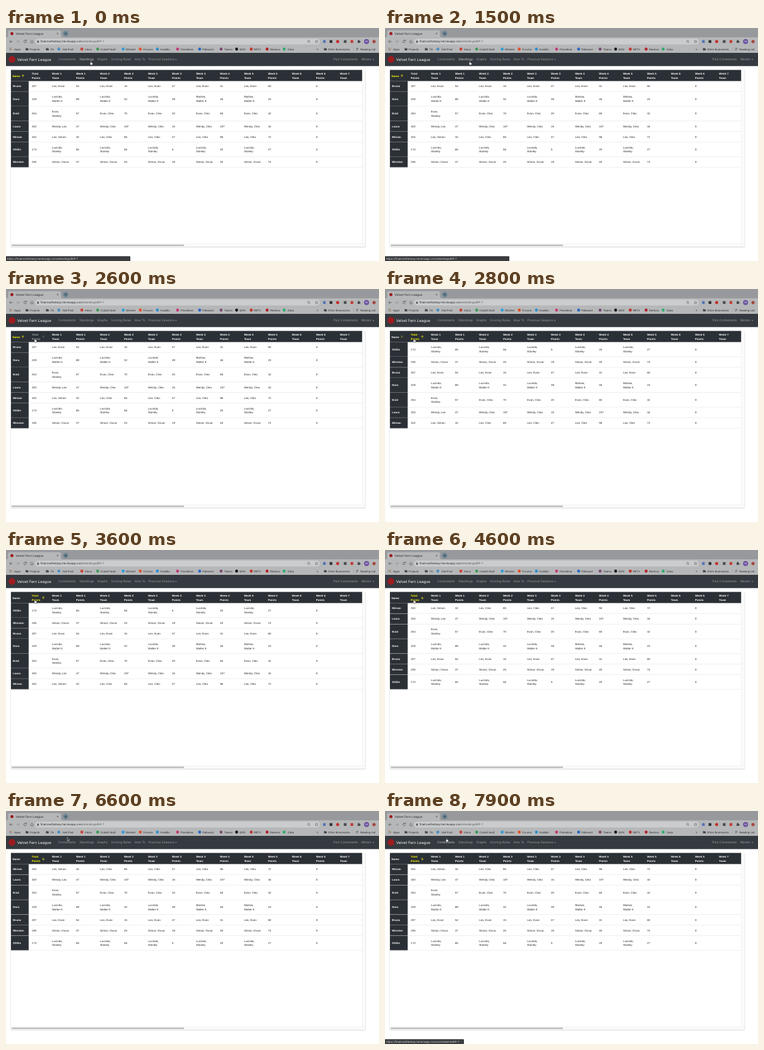
An HTML page that plays this animation: 600 px wide and 375 px high, repeating every 8 s.

```html
<!DOCTYPE html>
<html lang="en">
<head>
<meta charset="utf-8">
<title>Standings</title>
<style>
  html, body { margin: 0; width: 100%; height: 100%; overflow: hidden; background: #fff; }
  svg { display: block; width: 100vw; height: 100vh; }
  text { font-family: Inter, "Open Sans", sans-serif; text-rendering: geometricPrecision; white-space: pre; }
  .table text { font-family: "Liberation Sans", Arial, sans-serif; letter-spacing: .045px; }
</style>
</head>
<body>
<svg id="stage" viewBox="0 0 600 375"></svg>
<script>
const LOOP = 8000;
const TITLE = 'Velvet Fern League';
const HOST = 'finalrosefantasy.herokuapp.com';
const DARK = '#2b3036', NAV = '#343a40', ICON = '#46494c', ROSE = '#9c1c20';
const stage = document.getElementById('stage');

function add(parent, tag, attrs = {}, content = '') {
  const el = document.createElementNS('http://www.w3.org/2000/svg', tag);
  for (const key in attrs) el.setAttribute(key, attrs[key]);
  el.textContent = content;
  return parent.appendChild(el);
}
const group = (parent, attrs) => add(parent, 'g', attrs);
const rect = (parent, x, y, width, height, fill, rx = 0) =>
  add(parent, 'rect', { x, y, width, height, fill, rx });
const dot = (parent, cx, cy, r, fill) => add(parent, 'circle', { cx, cy, r, fill });
const line = (parent, d, stroke = ICON, width = .7) =>
  add(parent, 'path', { d, stroke, fill: 'none', 'stroke-width': width });
// y is the vertical middle of the line of text
const label = (parent, x, y, size, fill, content, extra = {}) =>
  add(parent, 'text', { x, y: y + size * .36, 'font-size': size, fill, ...extra }, content);
const show = (el, visible) => el.setAttribute('visibility', visible ? 'visible' : 'hidden');
const clamp = v => Math.min(1, Math.max(0, v));
const ease = v => v * v * (3 - 2 * v);
const progress = (t, start, end) => clamp((t - start) / (end - start));

function folder(x, y) {
  add(stage, 'path', { d: `M${x - 2.2} ${y - 1.8}h1.7l.6.6h2.1v3.2h-4.4Z`, fill: ICON });
}

function drawBrowser() {
  rect(stage, 0, 0, 600, 15, '#97999c');
  add(stage, 'path', { d: 'M1 15Q3.5 15 3.5 12.5V6Q3.5 3.5 6 3.5H86Q88.5 3.5 88.5 6V12.5Q88.5 15 91 15Z', fill: '#b6b7b8' });
  rect(stage, 0, 15, 600, 25, '#b6b7b8');
  dot(stage, 9.5, 9, 2.5, ROSE);
  label(stage, 15.5, 9.2, 4.9, '#26282a', TITLE);
  line(stage, 'M81.7 7.7l2.6 2.6m0-2.6l-2.6 2.6', ICON, .6);
  dot(stage, 96, 9, 4.4, '#6f8796');
  line(stage, 'M93.9 9h4.2M96 6.9v4.2', '#25343e', .7);

  line(stage, 'M10.5 21.8H6m2-2.1l-2.1 2.1 2.1 2.1');
  line(stage, 'M16.7 21.8h4.5m-2-2.1l2.1 2.1-2.1 2.1', '#85878a');
  line(stage, 'M32.6 20.4a2.1 2.1 0 1 0 .2 2M33 19v1.8h-1.8');
  line(stage, 'M39.2 21.8l2.5-2.3 2.5 2.3M40 21.5v2.4h3.4v-2.4', ICON, .6);
  rect(stage, 47, 17, 458, 9.6, '#cbcccd', 4.8);
  rect(stage, 50.1, 21.2, 2.8, 2.3, ICON, .3);
  line(stage, 'M50.7 21.3v-.8a.8.8 0 0 1 1.6 0v.8', ICON, .5);
  const url = label(stage, 55.5, 21.8, 4.45, '#1f2123', HOST);
  add(url, 'tspan', { fill: '#54575a' }, '/standings/BiP-7');
  line(stage, 'M488.2 22.6l1.3 1.4M488.4 21.3a1.6 1.6 0 1 0-3.2 0a1.6 1.6 0 1 0 3.2 0', ICON, .55);
  line(stage, 'M499.5 19.2l.7 1.7 1.8.1-1.4 1.2.5 1.8-1.6-1-1.6 1 .5-1.8-1.4-1.2 1.8-.1Z', ICON, .45);
  rect(stage, 510, 19.6, 4.3, 4.3, '#5474b8', 1);
  rect(stage, 520.5, 19.5, 4.5, 4.5, '#303437', .8);
  dot(stage, 533.5, 21.8, 2.5, '#c2302c');
  rect(stage, 543.4, 19.6, 4.4, 4.4, '#4b4d50', .8);
  rect(stage, 554.2, 19.6, 4.4, 4.4, '#c43a34', .8);
  rect(stage, 565.6, 20.2, 3.8, 3.8, ICON, .6);
  dot(stage, 567.4, 20, .9, ICON);
  dot(stage, 569.6, 22.1, .9, ICON);
  dot(stage, 580, 21.8, 4, '#6b4fa0');
  label(stage, 580, 21.8, 4, '#eee', 'M', { 'text-anchor': 'middle' });
  dot(stage, 592, 21.8, 2.6, '#a5483e');

  const bookmarks = [
    [85, 91, 'Hall Post', '#4b8fc4'], [122, 127.2, 'Inbox', '#c8453a'],
    [147.5, 152, 'Cobalt Vault', '#3f9a58'], [188.5, 192.7, 'Wrenlet', '#2f9bd8'],
    [216, 221, 'Forumo', '#e2522a'], [243.5, 248.3, 'Huddlio', '#2d8fd0'],
    [276, 281, 'Pixmellow', '#c23b78'], [311.5, 316, 'Palboard', '#2a69c4'],
    [346, 351, 'Teamo', '#7d4b74'], [371, 375.5, 'QVN', '#17191b'],
    [394.5, 399, 'RKTV', '#c23430'], [420, 425, 'Reelvox', '#b5242a'],
    [447.5, 453, 'Zubu', '#2fae6e']
  ];
  const dots = ['#c8453a', '#cf9b2d', '#3f9a58', '#3c73c0'];
  for (let i = 0; i < 9; i++)
    rect(stage, 5.6 + i % 3 * 1.5, 31.8 + Math.floor(i / 3) * 1.5, 1, 1, dots[i % 4]);
  const caption = (x, content) => label(stage, x, 34, 4.25, '#26282a', content);
  caption(13, 'Apps');
  folder(33.8, 34);
  caption(38, 'Projects');
  folder(66.5, 34);
  caption(71.5, 'TA');
  for (const [iconX, textX, name, color] of bookmarks) {
    dot(stage, iconX, 34, 2.4, color);
    caption(textX, name);
  }
  label(stage, 499.5, 33.7, 5, ICON, '»');
  folder(513.7, 34);
  caption(518, 'Other Bookmarks');
  line(stage, 'M559 31v6', '#8d8f91', .4);
  line(stage, 'M563.2 32.6h3.8m-3.8 1.5h3.8m-3.8 1.5h2.2', ICON, .6);
  caption(570, 'Reading List');
}

const navLinks = {};
function drawNav() {
  rect(stage, 0, 40, 600, 21.3, NAV);
  dot(stage, 9.7, 50.5, 5.4, ROSE);
  label(stage, 18, 50.6, 6, '#fff', TITLE);
  const links = [[84, 'Contestants'], [118, 'Standings'], [146.5, 'Graphs'], [169, 'Scoring Rules'],
    [206.5, 'How To'], [229, 'Previous Seasons'], [526.5, 'Pick Contestants'], [571.5, 'Miriam']];
  for (const [x, name] of links)
    navLinks[name] = label(stage, x, 50.6, 4.95, '#fff', name, { 'fill-opacity': .5 });
  for (const x of [271.8, 589.4])
    add(stage, 'path', { d: `M${x} 49.9h3l-1.5 1.6Z`, fill: '#fff', 'fill-opacity': .5 });
}

const HEADER_BOTTOM = 85.4, SINGLE = 17, DOUBLE = 23.6;
const columnX = i => 74.1 + 38.6 * i;
// name, weekly points, then teams: the last one repeats up to week 5
const players = [
  ['Bruno', [54, 15, 47, 31, 60], 'Leo, Evan'],
  ['Dora', [89, 32, 39, 46, 23], 'Lucinda,|Walter K', 'Lucinda,|Walter K', 'Lucinda,|Walter K', 'Marlow,|Walter K'],
  ['Enid', [57, 70, 20, 65, 42], 'Evan,|Stanley', 'Evan, Cleo'],
  ['Laura', [47, 107, 15, 107, 44], 'Wendy, Leo', 'Wendy, Cleo'],
  ['Miriam', [32, 85, 47, 96, 72], 'Leo, Simon', 'Leo, Cleo'],
  ['Ottilie', [65, 56, 5, 20, 27], 'Lucinda,|Stanley'],
  ['Winston', [37, 25, 19, 40, 74], 'Simon, Oscar']
].map(([name, points, ...teams]) => ({
  name, points, teams,
  total: points.reduce((a, b) => a + b),
  height: teams[0].includes('|') ? DOUBLE : SINGLE
}));
const byTotal = [...players].sort((a, b) => a.total - b.total);
const byTotalDown = [...byTotal].reverse();

function lines(parent, x, y, gap, fill, content, extra) {
  const parts = content.split('|');
  return parts.map((part, i) =>
    label(parent, x, y + (i - (parts.length - 1) / 2) * gap, 4.4, fill, part, extra));
}

const bold = { 'font-weight': 700 };
let nameHead, totalHead, nameArrow, totalArrow;
function drawTable() {
  const table = group(stage, { class: 'table' });
  rect(table, 7.4, 67.6, 571.4, 285.6, '#000', 1.2).setAttribute('opacity', .1);
  rect(table, 7.8, 67.4, 570.4, 285, '#d9d9d9', 1);
  rect(table, 8, 67.5, 570, 284.4, '#fff', 1);
  rect(table, 8, 67.5, 565, HEADER_BOTTOM - 67.5, DARK);
  rect(table, 573, 67.5, 5, 280, '#fafafa');
  line(table, 'M573 67.5V347.5', '#e6e6e6', .4);
  rect(table, 8, 347.4, 570, 4.5, '#fafafa');
  line(table, 'M8 347.4H578', '#e6e6e6', .4);
  rect(table, 9, 348.5, 277.5, 2.5, '#bdbdbd', 1.25);

  nameHead = lines(table, 10.6, 77, 0, '#fff', 'Name', bold);
  totalHead = lines(table, 41.6, 76.9, 7.4, '#fff', 'Total|Points', bold);
  for (let i = 0; i < 13; i++)
    lines(table, columnX(i), 76.9, 7.4, '#fff', `Week ${Math.floor(i / 2) + 1}|${i % 2 ? 'Points' : 'Team'}`, bold);
  const arrow = () => line(table, 'M0 2.1V-1.8M-1.9 0L0-1.9 1.9 0', 'yellow', .65);
  nameArrow = arrow();
  nameArrow.setAttribute('transform', 'translate(27.2 77)');
  totalArrow = arrow();

  for (const p of players) {
    p.row = group(table);
    const middle = p.height / 2;
    rect(p.row, 8, 0, 28.5, p.height + .1, DARK);
    line(p.row, `M8 ${p.height}H573`, '#dcdcdc', .45);
    lines(p.row, 11.2, middle, 0, '#fff', p.name, bold);
    const cell = (x, content) => lines(p.row, x, middle, 6.6, '#212121', String(content));
    cell(41.6, p.total);
    p.points.forEach((value, week) => {
      cell(columnX(2 * week), p.teams[Math.min(week, p.teams.length - 1)]);
      cell(columnX(2 * week + 1), value);
    });
    cell(columnX(11), 0);
  }
}

function drawStatus(path, width) {
  const bar = group(stage);
  rect(bar, -2, 367.2, width + 2, 10, '#3a3c3f', 1.2);
  label(bar, 2, 371.4, 4.3, '#d8d9da', `https://${HOST}/${path}/BiP-7`);
  return bar;
}

drawBrowser();
drawNav();
drawTable();
const standingsStatus = drawStatus('standings', 200);
const contestantsStatus = drawStatus('contestants', 127);
const pointer = add(stage, 'path', {
  d: 'M0 0V5.2L1.2 4.1 2 6 2.9 5.6 2.1 3.8H3.7Z',
  fill: '#111', stroke: '#fff', 'stroke-width': .5
});
const hand = add(stage, 'path', {
  d: 'M-.7.5a.6.6 0 0 1 1.3 0V2.3L2.5 2.8Q3 3 2.9 3.8L2.4 6H-.4L-2 3.7Q-1.9 2.9-1.2 3.2L-.7 3.7Z',
  fill: '#fff', stroke: '#111', 'stroke-width': .5
});

// start, end, x, y of each cursor move
const moves = [[1500, 2200, 46.7, 79.8], [5500, 6300, 98.6, 42.6], [7500, 7700, 99.2, 43.8]];
function cursorAt(t) {
  let x = 136.6, y = 53.4;
  for (const [start, end, toX, toY] of moves) {
    const k = ease(progress(t, start, end));
    x += (toX - x) * k;
    y += (toY - y) * k;
  }
  return { x, y };
}

function draw(t) {
  const { x, y } = cursorAt(t);
  const onStandings = x > 117 && x < 142 && y > 44 && y < 58;
  const onContestants = t >= 7600;
  const onTotal = x > 40 && x < 64 && y > 70 && y < 84;
  const isHand = onStandings || onContestants || onTotal;
  for (const cursor of [pointer, hand]) cursor.setAttribute('transform', `translate(${x} ${y})`);
  show(hand, isHand);
  show(pointer, !isHand);
  navLinks.Standings.setAttribute('fill-opacity', onStandings ? .75 : .5);
  navLinks.Contestants.setAttribute('fill-opacity', onContestants ? .75 : .5);
  show(standingsStatus, t < 1900);
  show(contestantsStatus, t >= 7900);

  const sorted = t >= 2800;
  nameHead[0].setAttribute('fill', sorted ? '#fff' : 'yellow');
  for (const part of totalHead) part.setAttribute('fill', sorted ? 'yellow' : onTotal ? '#a5a8ab' : '#fff');
  nameArrow.setAttribute('opacity', 1 - progress(t, 2700, 2900));
  totalArrow.setAttribute('stroke', sorted ? 'yellow' : '#a5a8ab');
  totalArrow.setAttribute('opacity', sorted ? 1 : onTotal ? .5 : 0);
  const turn = 180 * ease(progress(t, 3850, 4100));
  totalArrow.setAttribute('transform', `translate(60 77) rotate(${turn})`);

  let top = HEADER_BOTTOM;
  for (const p of t < 2800 ? players : t < 3900 ? byTotal : byTotalDown) {
    p.row.setAttribute('transform', `translate(0 ${top})`);
    top += p.height;
  }
}

const began = performance.now();
function tick() {
  const t = (performance.now() - began) % LOOP;
  draw(Math.floor(t / 100) * 100);
  requestAnimationFrame(tick);
}
tick();
</script>
</body>
</html>
```
